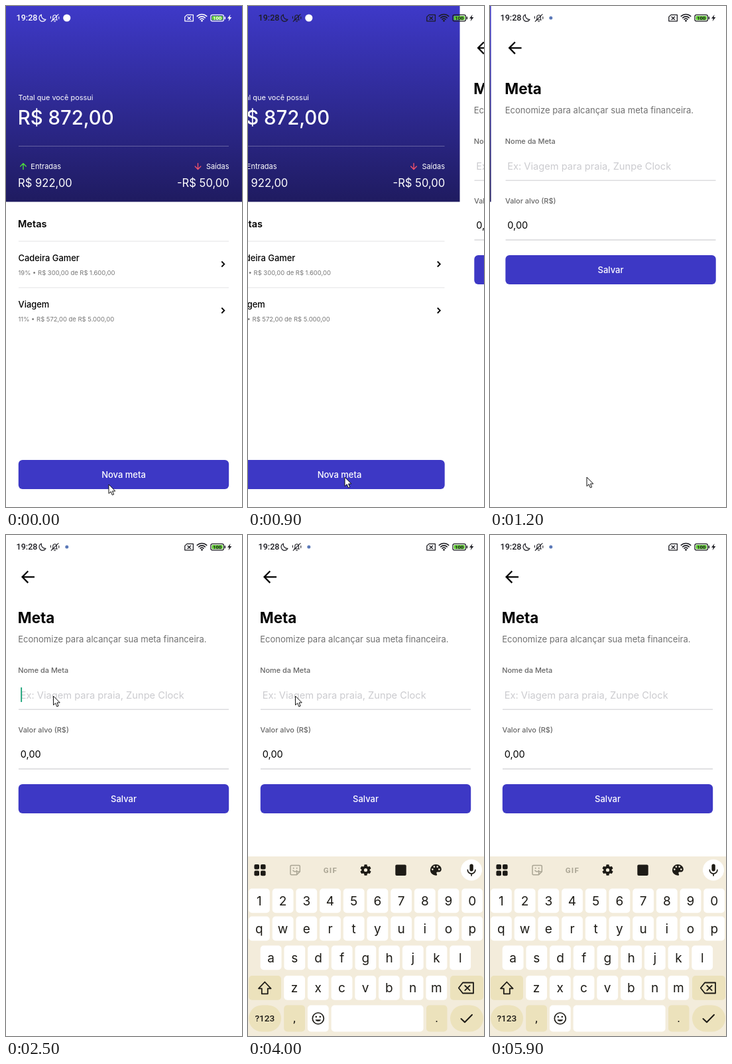
These frames come from a looping animation (356 by 756 pixels, 6200 ms). An HTML page:

```html
<!DOCTYPE html>
<html lang="pt-BR">
<head>
<meta charset="utf-8">
<title>Metas</title>
<style>
  html, body { margin: 0; width: 100%; height: 100%; overflow: hidden; background: #fff; }
  svg { display: block; width: 356px; height: 756px; }
  text { font-family: Inter, Roboto, sans-serif; white-space: pre; }
  .sys text { font-family: Roboto, "Open Sans", sans-serif; }
  .sys .caps text { font-family: Inter, Roboto, sans-serif; }
  .line { fill: none; stroke: currentColor; stroke-linecap: round; stroke-linejoin: round; }
</style>
</head>
<body>
<svg id="stage" viewBox="0 0 356 756" xmlns="http://www.w3.org/2000/svg"></svg>
<script>
const LOOP = 6200, STEP = 100;
const BLUE = '#3d38c5', INK = '#1d1b16', KEY = '#ece2bc';

const label = (x, y, size, str, fill = '#000', weight = 400, anchor = 'start') =>
  `<text x="${x}" y="${y}" font-size="${size}" fill="${fill}" font-weight="${weight}" text-anchor="${anchor}">${str}</text>`;
const box = (x, y, w, h, r, fill) =>
  `<rect x="${x}" y="${y}" width="${w}" height="${h}" rx="${r}" fill="${fill}"/>`;
const stroke = (d, color, width = 1.5) =>
  `<path class="line" d="${d}" style="color:${color}" stroke-width="${width}"/>`;
const dot = (x, y, r, fill) => `<circle cx="${x}" cy="${y}" r="${r}" fill="${fill}"/>`;

function button(y, str) {
  return box(18.8, y, 317.4, 44, 6, BLUE) + label(177.5, y + 27, 13, str, '#fff', 500, 'middle');
}

function goal(y, name, detail) {
  return box(19, y, 317, 1, 0, '#e4e4e6') +
    label(18.5, y + 30, 12.9, name, '#000', 500) +
    label(18.5, y + 51.7, 9.45, detail, '#777') +
    `<path d="M325.3 ${y + 31} l4 4 -4 4" fill="none" stroke="#000" stroke-width="1.8"/>`;
}

function home() {
  return box(-3, 0, 362, 756, 0, '#fff') + box(-3, 0, 362, 295.5, 0, 'url(#sky)') +
    label(18.5, 142.3, 10.95, 'Total que você possui', '#fff') +
    label(17.8, 179, 29.3, 'R$ 872,00', '#fff', 500) +
    box(19, 211, 317, 1, 0, 'rgba(255,255,255,.28)') +
    stroke('M26 246.5 V237.8 M21.7 242 L26 237.6 30.3 242', '#4cd83c', 1.4) +
    label(37.3, 246.3, 11, 'Entradas', '#fff') +
    label(18, 273.3, 16.6, 'R$ 922,00', '#fff') +
    stroke('M289.5 237.5 V246.3 M285.2 242 L289.5 246.5 293.8 242', '#f0506a', 1.4) +
    label(336.5, 246.3, 11, 'Saídas', '#fff', 400, 'end') +
    label(336.8, 273.3, 16.6, '-R$ 50,00', '#fff', 400, 'end') +
    label(18, 334.3, 14.5, 'Metas', '#000', 600) +
    goal(354.5, 'Cadeira Gamer', '19% • R$ 300,00 de R$ 1.600,00') +
    goal(424.5, 'Viagem', '11% • R$ 572,00 de R$ 5.000,00') +
    `<g id="add">${button(685, 'Nova meta')}</g>`;
}

function form() {
  return box(0, 0, 362, 756, 0, '#fff') +
    `<path d="M43 63.3 H25 M33.3 54.5 L24.6 63.3 33.3 72.1" fill="none" stroke="#000" stroke-width="2.3"/>` +
    label(17.8, 133, 22.4, 'Meta', '#000', 700) +
    label(18.2, 162, 13.05, 'Economize para alcançar sua meta financeira.', '#707070') +
    label(18.3, 208, 10.9, 'Nome da Meta', '#666', 500) +
    label(21.7, 247, 14.65, 'Ex: Viagem para praia, Zunpe Clock', '#cbcbcf') +
    box(19, 262.5, 317, 1.5, 0, '#dcdcdf') +
    label(18.5, 298, 10.9, 'Valor alvo (R$)', '#666', 500) +
    label(21.8, 336.4, 14.5, '0,00') +
    box(19, 352.3, 317, 1.4, 0, '#d4d4d7') +
    button(376, 'Salvar') +
    `<g id="caret">${box(22.3, 230, 1.8, 22, 0, '#12a074')}</g>`;
}

function statusBar() {
  const c = 'currentColor';
  const arcs = [9.6, 6.4, 3.3].map(r => {
    const s = r * 0.75;
    return `<path class="line" d="M${295.5 - s} ${22.6 - s} A${r * 1.1} ${r * 1.1} 0 0 1 ${295.5 + s} ${22.6 - s}" stroke-width="1.6"/>`;
  }).join('');
  return label(15.5, 22.4, 12.6, '19:28', c, 500) +
    stroke('M53.4 13 A5.3 5.3 0 1 0 60 20.3 A6 6 0 0 1 53.4 13 Z', c, 1.2) +
    stroke('M69.6 21 H77.4 M70.8 20.8 V16.8 a2.8 3 0 0 1 5.6 0 V20.8 M72.6 23.2 H74.6 M68.2 23.4 L79 12.6 M67.4 15.8 V18.6 M79.8 16.4 V19.2', c, 1.1) +
    '<circle id="badge" cx="91.8" cy="18"/>' +
    stroke('M273 13.4 H282.4 V22.8 H269.8 V16.4 Z M274 16.2 L278.6 20.4 M278.6 16.2 L274 20.4', c, 1.3) +
    arcs + dot(295.5, 22.3, 1.4, c) +
    `<rect x="308.9" y="13.3" width="19.6" height="9.6" rx="2.6" fill="none" stroke="${c}" stroke-width="1.2"/>` +
    box(310.5, 14.9, 16.4, 6.4, 1.2, '#62cc35') + box(329.6, 16, 1.5, 4.2, 0.7, c) +
    label(318.7, 20.9, 7.6, '100', c, 700, 'middle') +
    `<path d="M338.6 13 L334 18.8 H336.7 L335.6 23 L340.4 16.9 H337.5 Z" fill="${c}"/>`;
}

function gear(x, y) {
  let teeth = '';
  for (let a = 0; a < 360; a += 60)
    teeth += `<rect x="${x - 2.2}" y="${y - 8.2}" width="4.4" height="4" rx=".8" fill="${INK}" transform="rotate(${a} ${x} ${y})"/>`;
  return teeth + `<circle cx="${x}" cy="${y}" r="4.4" fill="none" stroke="${INK}" stroke-width="3.6"/>`;
}

function toolbar() {
  const gray = '#aaa594', y = 505.5;
  let s = '';
  for (const dx of [0, 9.6]) for (const dy of [0, 9.6]) s += box(9.4 + dx, 497 + dy, 7.6, 7.6, 2, INK);
  s += stroke('M65.5 498.5 H76.8 a1.5 1.5 0 0 1 1.5 1.5 V508 L73.5 512.7 H65.5 a1.5 1.5 0 0 1 -1.5 -1.5 V500 a1.5 1.5 0 0 1 1.5 -1.5 M78 508 H73.6 V512.4 M68 506.4 q3 3 5.6 0', gray, 1.5);
  s += dot(68.7, 502.8, 1, gray) + dot(73.7, 502.8, 1, gray);
  s += `<g letter-spacing="1.2">${label(124.4, 509.6, 11.6, 'GIF', gray, 700, 'middle')}</g>`;
  s += gear(177.5, y) + box(222.3, 497.5, 16.4, 16.4, 2, INK);
  s += `<path d="M283.3 497 a8.4 8.4 0 0 0 0 16.8 c2.4 0 2-2 1.3-2.9 c-.7-1.4 .2-2.3 1.6-2.3 h2 c2.2 0 3.6-1.7 3.6-4 c0-4.4-4-7.6-8.5-7.6" fill="${INK}"/>`;
  for (const [dx, dy] of [[-5, 0], [-2.4, -4], [2.4, -4], [5, 0]]) s += dot(283.3 + dx, 504.6 + dy, 1.3, '#f3ecdb');
  s += dot(337, y, 16, '#fff') + box(334.4, 496.5, 5.4, 11, 2.7, INK);
  return s + stroke('M331.3 505.3 a5.8 5.8 0 0 0 11.6 0 M337.1 511.2 V514', INK, 1.7);
}

function keyboard() {
  const pitch = 35.7;
  const rows = [['1234567890', 1, 533.5], ['qwertyuiop', 1, 575.5], ['asdfghjkl', 18.7, 619.5], ['zxcvbnm', 54.2, 665]];
  let s = box(0, 485, 356, 275, 0, '#f3ecdb') + toolbar();
  for (const [chars, x0, y] of rows)
    [...chars].forEach((ch, i) => {
      const x = x0 + i * pitch;
      s += box(x, y, 31.8, 36.8, 5, '#fff') +
        `<g class="caps">${label(x + 15.9, y + 25, 19, ch, INK, 400, 'middle')}</g>`;
    });
  s += box(1, 665, 49, 36.8, 5, KEY) + box(305, 665, 50, 36.8, 5, KEY);
  s += stroke('M25.3 674.5 L34.6 684.3 H29.8 V692.3 H20.8 V684.3 H16 Z', INK, 1.8);
  s += stroke('M324 675.5 H340 V691.5 H324 L317.8 683.5 Z M327.3 680 L334.6 687.2 M334.6 680 L327.3 687.2', INK, 1.8);
  s += box(1, 709.5, 49, 40, 20, KEY) + label(25.3, 734.3, 13.6, '?123', INK, 500, 'middle');
  s += box(54.2, 709.5, 31.8, 40, 5, KEY) + label(70, 735, 18, ',', INK, 400, 'middle');
  s += box(89.9, 709.5, 31.8, 40, 5, '#fff') + box(125.6, 709.5, 139, 40, 5, '#fff');
  s += stroke('M114.3 729.5 a8.5 8.5 0 1 1 -17 0 a8.5 8.5 0 1 1 17 0', INK, 1.7);
  s += dot(102.8, 727, 1.3, INK) + dot(108.8, 727, 1.3, INK);
  s += `<path d="M101.6 731.2 h8.4 a4.3 3.4 0 0 1 -8.4 0" fill="${INK}"/>`;
  s += box(269, 709.5, 31.5, 40, 5, KEY) + label(284.7, 735, 18, '.', INK, 400, 'middle');
  return s + box(305, 709.5, 50, 40, 20, KEY) + stroke('M321.5 730 L327 735.2 338 724', INK, 2);
}

const stage = document.getElementById('stage');
stage.innerHTML =
  `<defs><linearGradient id="sky" x2="0" y2="1"><stop stop-color="#3e39c8"/><stop offset="1" stop-color="#1f1b60"/></linearGradient></defs>
  <g id="home">${home()}</g>
  <g id="form">${form()}</g>
  <g id="keys" class="sys">${keyboard()}</g>
  <g id="status" class="sys">${statusBar()}</g>
  <path id="cursor" d="M0 0 V13.6 L3.2 10.8 5.3 15.9 7.6 15 5.5 10 H9.8 Z" fill="#fff" stroke="#111" stroke-width="1"/>`;

const el = Object.fromEntries([...stage.querySelectorAll('[id]')].map(n => [n.id, n]));

// Tracks: [time, value, ...] with linear steps between
const POINTER = [
  [0, 155, 722], [300, 146, 711], [1200, 146, 711], [1500, 130, 580], [1700, 98, 400],
  [1900, 77, 297], [2000, 74.5, 267], [2200, 71.5, 243], [5100, 71.5, 243], [5300, 133, 165]
];
const PRESS = [[500, 1], [600, 0.7], [700, 0.7], [900, 1]];
const CARET = [[2400, 3000], [3500, 4000], [4400, 4900], [5400, 5900]];

function sample(track, t) {
  const i = track.findIndex(k => k[0] > t);
  if (i < 0) return track[track.length - 1].slice(1);
  if (i === 0) return track[0].slice(1);
  const a = track[i - 1], b = track[i], p = (t - a[0]) / (b[0] - a[0]);
  return a.slice(1).map((v, j) => v + (b[j + 1] - v) * p);
}
const progress = (t, start, length) => Math.min(1, Math.max(0, (t - start) / length));
const move = (node, x, y) => node.setAttribute('transform', `translate(${x.toFixed(2)} ${y.toFixed(2)})`);
const show = (node, on) => node.setAttribute('visibility', on ? 'visible' : 'hidden');

function draw(t) {
  const slide = 362 * (1 + Math.cos(Math.PI * progress(t, 810, 420))) / 2;
  move(el.form, slide, 0);
  move(el.home, slide - 362, 0);
  el.add.setAttribute('opacity', sample(PRESS, t)[0]);

  el.status.style.color = t < 900 ? '#fff' : '#1c1c22';
  el.badge.setAttribute('r', t < 1100 ? 5.6 : 2.5);
  el.badge.setAttribute('fill', t < 1100 ? '#fff' : '#5b79b8');

  move(el.keys, 0, 271 * (1 - progress(t, 2720, 280)) ** 2);
  show(el.keys, t >= 2800);
  show(el.caret, CARET.some(([on, off]) => t >= on && t < off));

  move(el.cursor, ...sample(POINTER, t));
  show(el.cursor, t < 5400);
}

const start = performance.now();
function tick() {
  const t = Math.max(0, performance.now() - start) % LOOP;
  draw(Math.floor(t / STEP) * STEP);
  requestAnimationFrame(tick);
}
tick();
</script>
</body>
</html>
```
